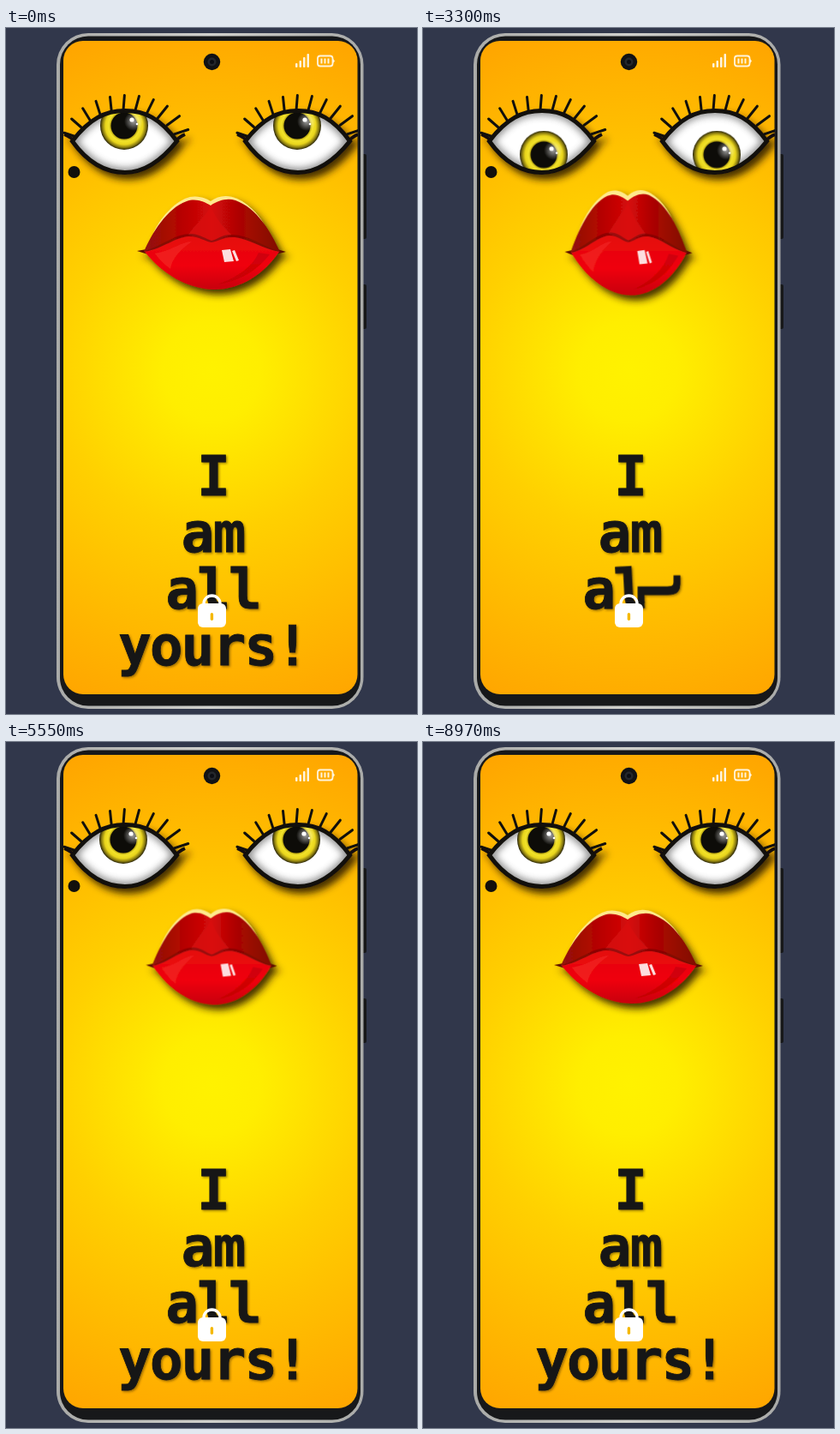
Write an HTML page that moves like this. It is 480x800 px and loops after 9000 ms.

```html
<!DOCTYPE html>
<html lang="en">
<head>
<meta charset="utf-8">
<title>All yours</title>
<style>
html, body { margin: 0; width: 100%; height: 100%; overflow: hidden; background: #31374b; }
svg { display: block; width: 480px; height: 800px; }

.iris { animation: look 9s ease-in-out infinite; }
@keyframes look {
  0%, 100% { transform: translate(138px, 114px); }
  12.67% { transform: translate(131px, 145px); }
  26.67% { transform: translate(138px, 158px); }
  46.33% { transform: translate(144px, 138px); }
  61.67% { transform: translate(137px, 114px); }
  72.33% { transform: translate(135px, 106px); }
}

.lips { transform-origin: 240px 251px; animation: kiss 9s ease-in-out infinite; }
@keyframes kiss {
  0%, 100% { transform: scale(1, 1); }
  12.67% { transform: scale(1.034, 1.194); }
  26.67% { transform: scale(.885, 1.185); }
  46.33% { transform: scale(.828, 1.065); }
  61.67% { transform: scale(.88, 1.028); }
  72.33% { transform: scale(.747, .843); }
}

.letter {
  font: bold 64px "DejaVu Sans Mono", "Noto Sans Mono", monospace;
  text-anchor: middle;
  fill: #141414;
  stroke: #141414;
  stroke-width: .8px;
  animation: tumble 9s ease-in-out infinite;
}
@keyframes tumble {
  0%, 16.8%, 30.47%, 100% { transform: translate(0, 0) rotate(0deg); }
  19.02%, 26.02% { transform: translate(var(--dx), var(--dy)) rotate(var(--turn)); }
}
</style>
</head>
<body>
<svg viewBox="0 0 480 800">
  <defs>
    <radialGradient id="glow" gradientUnits="userSpaceOnUse" cx="240" cy="400" r="410">
      <stop offset="0" stop-color="#fff200"/>
      <stop offset=".14" stop-color="#ffee00"/>
      <stop offset=".45" stop-color="#ffd000"/>
      <stop offset="1" stop-color="#ffa600"/>
    </radialGradient>
    <radialGradient id="irisFill">
      <stop offset=".5" stop-color="#8d7600"/>
      <stop offset=".64" stop-color="#f3e32a"/>
      <stop offset=".78" stop-color="#e9d51c"/>
      <stop offset=".9" stop-color="#8f8010"/>
      <stop offset="1" stop-color="#26220a"/>
    </radialGradient>
    <radialGradient id="pearl">
      <stop offset="0" stop-color="#fff" stop-opacity=".6"/>
      <stop offset="1" stop-color="#fff" stop-opacity="0"/>
    </radialGradient>
    <linearGradient id="upper" x1="0" x2="1">
      <stop offset="0" stop-color="#8f1408"/>
      <stop offset=".28" stop-color="#b80404"/>
      <stop offset=".5" stop-color="#d60808"/>
      <stop offset=".7" stop-color="#ad0505"/>
      <stop offset="1" stop-color="#801006"/>
    </linearGradient>
    <linearGradient id="lower" x1="0" y1="0" x2="0" y2="1">
      <stop offset="0" stop-color="#e50d10"/>
      <stop offset=".55" stop-color="#f00007"/>
      <stop offset="1" stop-color="#c80008"/>
    </linearGradient>
    <linearGradient id="rim" x1="0" x2="1">
      <stop offset="0" stop-color="#a9aaa8"/>
      <stop offset=".5" stop-color="#d0d0cc"/>
      <stop offset="1" stop-color="#a9aaa8"/>
    </linearGradient>
    <filter id="soft" x="-30%" y="-30%" width="160%" height="160%"><feGaussianBlur stdDeviation="4"/></filter>
    <filter id="drop" x="-20%" y="-20%" width="150%" height="160%">
      <feDropShadow dx="5" dy="6" stdDeviation="4" flood-color="#301a00" flood-opacity=".9"/>
    </filter>
    <filter id="faint" x="-5%" y="-5%" width="110%" height="110%">
      <feDropShadow dx="1.5" dy="1.5" stdDeviation="1" flood-color="#402800" flood-opacity=".5"/>
    </filter>
    <clipPath id="screen"><rect x="67" y="15" width="343.5" height="762" rx="23"/></clipPath>
    <path id="almond" d="M78 132C98 106 116 97 139 97C162 97 180 106 199 132C179 157 160 168 139 168C116 168 96 157 78 132Z"/>
    <clipPath id="lid"><use href="#almond"/></clipPath>
  </defs>

  <rect width="480" height="800" fill="#31374b"/>
  <g fill="#171819">
    <rect x="414" y="147" width="7" height="99" rx="2"/>
    <rect x="414" y="299" width="7" height="52" rx="2"/>
  </g>
  <rect x="59" y="6" width="358.5" height="788" rx="37" fill="url(#rim)"/>
  <rect x="63" y="9.5" width="351" height="781" rx="33" fill="#17181a"/>

  <g clip-path="url(#screen)">
    <rect x="67" y="15" width="344" height="762" fill="url(#glow)"/>
    <g class="eye">
      <g filter="url(#drop)">
        <use href="#almond" fill="#fff" stroke="#12100c" stroke-width="6"/>
        <path d="M68 124Q76 127 82 134M196 134Q202 127 209 124" fill="none" stroke="#12100c" stroke-width="4"/>
      </g>
      <path class="lashes" fill="none" stroke="#12100c" stroke-width="3" stroke-linecap="round"/>
      <g clip-path="url(#lid)">
        <use href="#almond" fill="#fff"/>
        <use href="#almond" fill="none" stroke="#444" stroke-width="9" opacity=".65" filter="url(#soft)"/>
        <g class="iris">
          <circle r="28" fill="url(#irisFill)"/>
          <circle r="15.5" fill="#0d0c08"/>
          <circle cx="11" cy="-5" r="11" fill="url(#pearl)"/>
          <circle cx="9" cy="-7" r="2.6" fill="#fff"/>
          <circle cx="15" cy="-2" r="1.3" fill="#fff"/>
        </g>
      </g>
      <use href="#almond" fill="none" stroke="#12100c" stroke-width="4"/>
    </g>
    <circle cx="79.5" cy="168" r="7" fill="#12100c"/>

    <g filter="url(#drop)">
      <g class="lips">
        <path d="M171 242C177 226 192 207 209 199C220 194 231 197 239 202C248 195 259 194 270 199C287 207 299 222 306 238L240 240Z" fill="#ffe98e"/>
        <path d="M153 260L164 258L166 264ZM327 261L317 258L315 264Z" fill="#5c0d06"/>
        <path d="M161 261C170 240 188 210 211 202C222 198 232 203 239 207C248 201 258 198 268 201C293 210 309 237 320 261C292 266 265 260 240 262C214 260 190 266 161 261Z" fill="url(#upper)"/>
        <path d="M239 209C232 220 222 229 213 241L239 248L263 241C252 231 245 221 239 209Z" fill="#dc1512" opacity=".7"/>
        <path d="M163 260C185 252 200 239 217 240C228 241 233 246 240 248C248 246 253 240 265 241C284 242 298 253 318 260L240 258Z" fill="#740708" opacity=".6"/>
        <path d="M162 261C184 257 197 244 214 243C226 243 232 249 240 250C248 249 254 243 267 244C284 246 299 257 319 261C302 286 275 305 243 305C211 304 183 287 162 261Z" fill="url(#lower)"/>
        <path d="M174 263C193 260 203 250 217 249C204 258 194 268 192 281C185 276 179 270 174 263Z" fill="#f4322c" opacity=".55"/>
        <path d="M308 264C294 282 274 295 247 299C272 290 288 278 295 262Z" fill="#b60007" opacity=".5"/>
        <path d="M252 259L262 258L266 272L255 273ZM264 260L267 259L272 271L269 272Z" fill="#fff" opacity=".87"/>
      </g>
    </g>

    <g id="words" filter="url(#faint)"></g>

    <path d="M231 674V671A9.5 9 0 0 1 250 671V674" fill="none" stroke="#fff" stroke-width="3.4"/>
    <rect x="224" y="671" width="33" height="28" rx="6" fill="#fff"/>
    <rect x="238.7" y="682" width="3.4" height="9" rx="1.7" fill="#f5b800"/>

    <g fill="#fff4dc">
      <rect x="338" y="41" width="2.5" height="5" rx="1"/>
      <rect x="342.5" y="38" width="2.5" height="8" rx="1"/>
      <rect x="347" y="34" width="2.5" height="12" rx="1"/>
      <rect x="351.5" y="30" width="2.5" height="16" rx="1"/>
      <rect x="367.5" y="35.5" width="2" height="6"/>
      <rect x="371.5" y="35.5" width="2" height="6"/>
      <rect x="375.5" y="35.5" width="2" height="6"/>
      <path d="M382 36L384 38.5L382 41Z"/>
    </g>
    <rect x="364" y="32.5" width="17.5" height="12" rx="3" fill="none" stroke="#fff4dc" stroke-width="1.8"/>
  </g>

  <circle cx="240.5" cy="39.5" r="9.7" fill="#111214"/>
  <circle cx="240.5" cy="39.5" r="5" fill="#24272c"/>
  <circle cx="240.5" cy="39.5" r="2.5" fill="#0b0d13"/>
</svg>

<script>
const NS = "http://www.w3.org/2000/svg";
const STAGGER = 0.148;
const PITCH = 36.8;

// Lashes fan out between two ellipses, sparser towards the corners.
let lashes = "";
for (let k = -5; k <= 5; k++) {
  const a = (92 - 13 * k - 0.08 * k ** 3) * Math.PI / 180;
  const c = Math.cos(a), s = Math.sin(a);
  lashes += `M${139 + 60 * c} ${135 - 38 * s}L${141 + 75 * c} ${135 - 56.5 * s}`;
}
const eye = document.querySelector(".eye");
eye.querySelector(".lashes").setAttribute("d", lashes);
const secondEye = eye.cloneNode(true);
secondEye.setAttribute("transform", "translate(202 0)");
eye.after(secondEye);

// Furthest pose of each letter: x, y, turn. The last word drops off the screen.
const poses = [
  [31, 66, -122],
  [68, 40, -170], [71, 0, -140],
  [33, -20, -140], [8, -4, -220], [2, -8, -215]
];
const fall = [-4, 90, -130];

const words = document.getElementById("words");
let index = 0;
["I", "am", "all", "yours!"].forEach((word, row) => {
  [...word].forEach((char, col) => {
    const spot = document.createElementNS(NS, "g");
    const x = 242.5 + (col - (word.length - 1) / 2) * PITCH;
    spot.setAttribute("transform", `translate(${x} ${525 + row * 66})`);
    const letter = document.createElementNS(NS, "text");
    letter.textContent = char;
    letter.setAttribute("class", "letter");
    letter.setAttribute("y", 20);
    const [dx, dy, turn] = poses[index] || fall;
    letter.style.setProperty("--dx", dx + "px");
    letter.style.setProperty("--dy", dy + "px");
    letter.style.setProperty("--turn", turn + "deg");
    letter.style.animationDelay = index * STAGGER + "s";
    spot.append(letter);
    words.append(spot);
    index++;
  });
});
</script>
</body>
</html>
```
